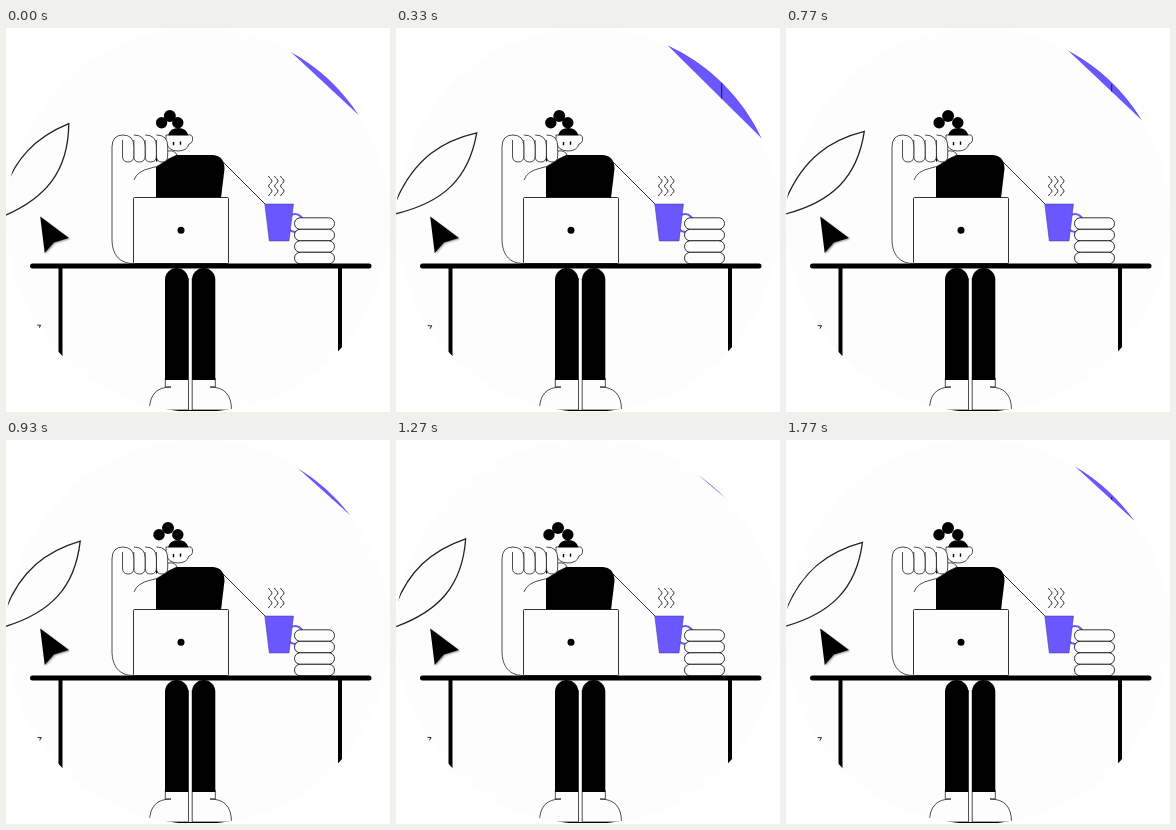
An HTML page with a canvas that plays this animation: 384 by 384 pixels, repeating every 1.81 s.

```html
<!DOCTYPE html>
<html lang="en">
<head>
<meta charset="utf-8">
<title>Desk</title>
<style>
html, body { margin: 0; width: 100%; height: 100%; overflow: hidden; background: #fff; }
canvas { display: block; width: 100vmin; height: 100vmin; }
</style>
</head>
<body>
<canvas id="c"></canvas>
<script>
const LOOP = 1810, HIGH = 430, LOW = 1250;
const SIZE = 384, R = SIZE / 2;
const INK = '#000', PAPER = '#fdfdfd', VIOLET = '#6a58fe';
const canvas = document.getElementById('c');
const g = canvas.getContext('2d');
const rad = d => d * Math.PI / 180;

function fit() {
  const k = Math.min(innerWidth, innerHeight) / SIZE * (devicePixelRatio || 1);
  canvas.width = canvas.height = Math.round(SIZE * k);
  g.setTransform(k, 0, 0, k, 0, 0);
}

// Sine ease from a at time t0 to b at time t1.
function ease(t, t0, t1, a, b) {
  const u = Math.min(1, Math.max(0, (t - t0) / (t1 - t0)));
  return a + (b - a) * (1 - Math.cos(Math.PI * u)) / 2;
}

// Both leaves sway in step: up to a high point, down to a low one, part way back.
function sway(t, start, high, low, end) {
  if (t < HIGH) return ease(t, 0, HIGH, start, high);
  if (t < LOW) return ease(t, HIGH, LOW, high, low);
  return ease(t, LOW, LOOP, low, end);
}

const leafTurn = t => sway(t, -9.5, 1.2, -6, -2.4);
const leafSpan = t => sway(t, 14.1, 21.2, 5.6, 12.3);

function shape(d, fill, stroke, width = 0.8) {
  const p = typeof d === 'string' ? new Path2D(d) : d;
  if (fill) { g.fillStyle = fill; g.fill(p); }
  if (stroke) { g.strokeStyle = stroke; g.lineWidth = width; g.stroke(p); }
}

function dot(x, y, r) {
  g.beginPath();
  g.arc(x, y, r, 0, 7);
  g.fillStyle = INK;
  g.fill();
}

function pill(x, y, w, h, r, fill, stroke) {
  const p = new Path2D();
  p.roundRect(x, y, w, h, r);
  shape(p, fill, stroke);
}

function whiteLeaf(t) {
  g.save();
  g.translate(16, 210);
  g.rotate(rad(leafTurn(t)));
  g.translate(-16, -210);
  shape('M-2 178C18 128 50 112 81 105C73 150 48 176 -6 187', null, '#222', 1.3);
  g.restore();
}

// A segment of the big circle, cut off by a straight edge.
function violetLeaf(t) {
  const half = leafSpan(t), mid = -51 + half * 0.28;
  g.save();
  g.beginPath();
  g.arc(R, R, R, rad(mid - half), rad(mid + half));
  g.closePath();
  g.fillStyle = VIOLET;
  g.fill();
  g.clip();
  shape(`M325.7 ${55 - leafTurn(t) * 0.8}V80`, null, '#1c1747', 1);
  g.restore();
}

function cursor() {
  g.save();
  g.shadowColor = 'rgba(0,0,0,.4)';
  g.shadowBlur = 2;
  g.shadowOffsetX = g.shadowOffsetY = 1;
  shape('M34.2 188.5L63 210L48 214.5L38.7 225Z', INK);
  g.restore();
}

function legs() {
  shape('M159.3 350V359H165Q143.5 359 143.5 382H182.5V250', PAPER, INK, 0.7);
  shape('M209.3 350V359H204Q225.5 359 225.5 382H186.2V250', PAPER, INK, 0.7);
  for (const x of [159, 186]) pill(x, 240, 23.3, 112, [11.6, 11.6, 0, 0], INK);
  shape('M164 382.5H220', null, INK, 1.2);
}

function head(t) {
  const s = ease(t, 0, 900, 2.6, 0);
  dot(153 + s, 94.7, 5.7);
  dot(162 + s * 0.7, 88, 6);
  dot(171.8, 94.7, 5.7);
  shape('M160 107V114Q162 123 172 123Q181 123 183 116Q187 115 186.5 110Q186 106 182 107Z', PAPER, INK, 0.7);
  shape('M162 107.3Q164 100 172.5 100Q180 100 182.5 107.3Z', INK);
  const blink = t > 1030 && t < 1140;
  if (blink) shape('M166 115.7H169M173 115.2H176', null, '#555', 0.7);
  else shape('M167.5 114V117.2M174.5 113.6V116.8', null, INK, 1.4);
}

function body(t) {
  shape('M217 134L261 178', null, INK);
  shape('M150 127H207Q218.5 128 218.5 141L215 170H150Z', INK);
  head(t);
  // forearm, then thumb and fingers
  const arm = 'M127.5 235.5C113 235.5 106 226 106 211V119Q106 107 117 107';
  shape(arm + 'H150V169H127.5Z', PAPER);
  shape(arm, null, INK, 0.7);
  shape('M150 134L162 123Q169 122 171 127Q163 130 155 136L150 139Z', PAPER);
  shape('M162 123Q169 122 171 127Q163 130 155 136Q151 139 145 140Q131 143 128 152', null, INK, 0.7);
  for (let i = 3; i >= 0; i--) {
    const x = 116.5 + i * 11.3, r = x + 11.3;
    shape(`M${x} 112V128Q${x} 134 ${x + 5.6} 134Q${r} 134 ${r} 128V118Q${r} 107 ${x} 107`, PAPER, INK, 0.7);
  }
}

function laptop() {
  pill(127.5, 169.5, 95, 66, 1, PAPER, INK);
  dot(175, 202.2, 3.5);
}

function steam(x) {
  const p = new Path2D();
  for (let y = 0; y <= 20; y++) p.lineTo(x - 1.7 * Math.cos(y * Math.PI / 5), 148 + y);
  shape(p, null, '#222', 0.9);
}

function mug() {
  for (let i = 0; i < 3; i++) steam(264.3 + i * 6);
  g.beginPath();
  g.ellipse(289, 195, 8.5, 9, 0, 0, 7);
  g.strokeStyle = VIOLET;
  g.lineWidth = 2.2;
  g.stroke();
  shape('M258.8 176H287.5L283 213H263.3Z', VIOLET, '#3c3190', 0.5);
  for (let i = 0; i < 4; i++) pill(288.5, 189.8 + i * 11.5, 40, 11.5, 5.7, PAPER, INK);
}

function table() {
  shape('M54.5 238V340M334 238V340', null, INK, 4);
  g.lineCap = 'round';
  shape('M26.5 238H363', null, INK, 5);
  g.lineCap = 'butt';
}

function stem(t) {
  const n = leafTurn(t) * 0.12;
  shape(`M31 ${297.8 + n / 2}H${35.8 + n}L${33.5 + n} ${301.5 + n / 2}`, null, '#222', 1);
}

function draw(t) {
  g.fillStyle = '#fff';
  g.fillRect(0, 0, SIZE, SIZE);
  g.save();
  g.beginPath();
  g.arc(R, R, R, 0, 7);
  g.fillStyle = PAPER;
  g.fill();
  g.clip();
  violetLeaf(t);
  whiteLeaf(t);
  legs();
  body(t);
  laptop();
  mug();
  table();
  cursor();
  stem(t);
  g.restore();
}

addEventListener('resize', fit);
fit();
(function tick() {
  draw(performance.now() % LOOP);
  requestAnimationFrame(tick);
})();
</script>
</body>
</html>
```
